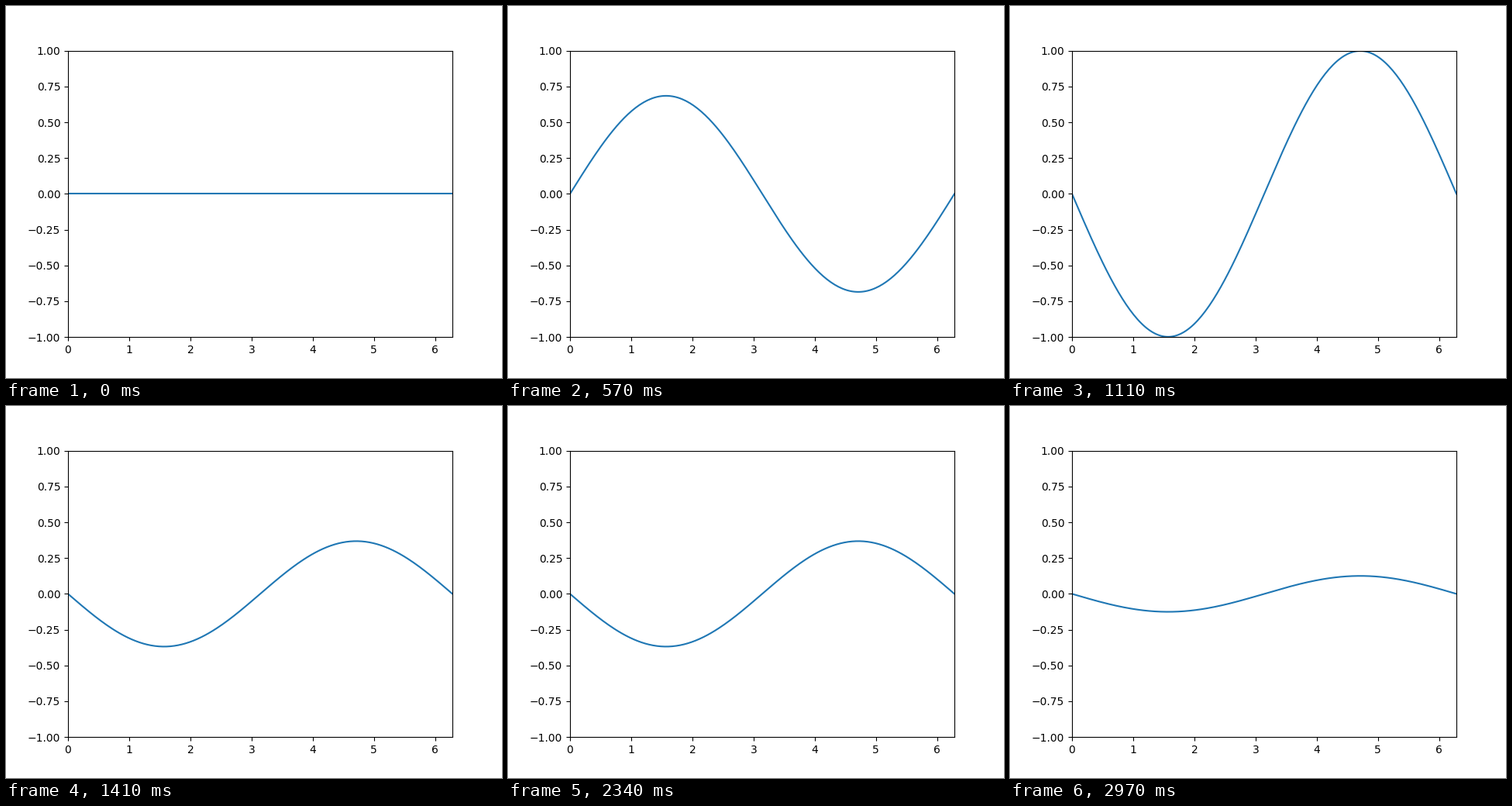
These frames come from a looping animation (640 by 480 pixels, 3 s). A matplotlib script:

```python
import numpy as np
import matplotlib.pyplot as plt
from matplotlib.animation import FuncAnimation

FRAMES = 100
INTERVAL = 30  # ms
PERIOD = 50    # frames per oscillation

fig, ax = plt.subplots(figsize=(6.4, 4.8), dpi=100)
ax.set_xlim(0, 2 * np.pi)
ax.set_ylim(-1, 1)

x = np.linspace(0, 2 * np.pi, 200)
wave = np.sin(x)
line, = ax.plot(x, np.zeros_like(x), color="tab:blue", lw=1.5)


def update(i):
    """Standing wave: a fixed sine scaled by an oscillating amplitude."""
    line.set_ydata(np.sin(2 * np.pi * i / PERIOD) * wave)
    return line,


anim = FuncAnimation(fig, update, frames=FRAMES, interval=INTERVAL,
                     repeat=True, repeat_delay=0)
plt.show()
```
